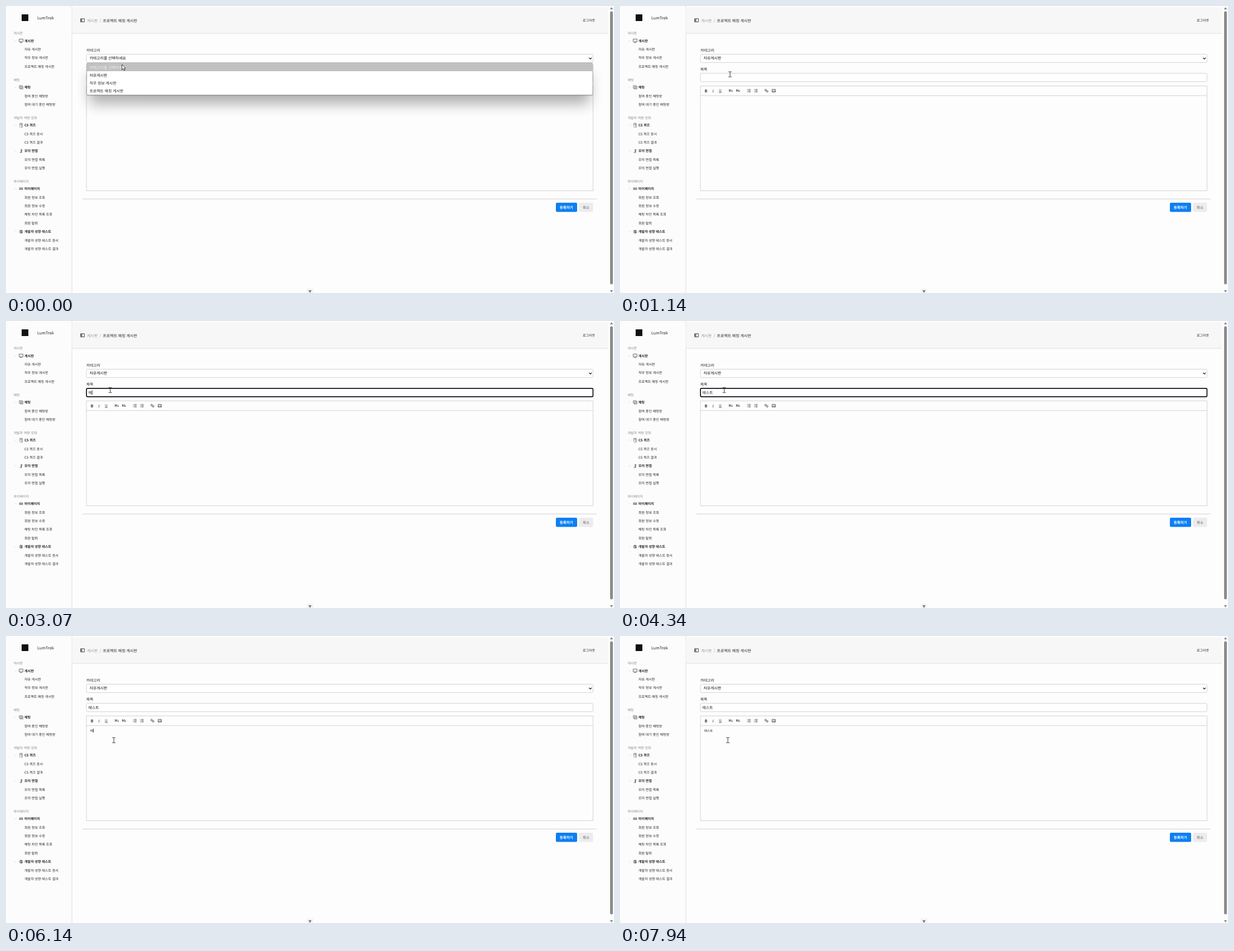
These frames come from a looping animation (1088x515 px, 8 s). An HTML page:

```html
<!DOCTYPE html>
<html lang="ko">
<head>
<meta charset="utf-8">
<title>게시글 작성</title>
<style>
  html, body { margin: 0; width: 100%; height: 100%; overflow: hidden; background: #fdfdfd; }
  svg { display: block; width: 1088px; height: 515px; }
  text { font-family: "Noto Sans CJK KR", "Noto Sans CJK", "Noto Sans", sans-serif; text-rendering: geometricPrecision; white-space: pre; }
</style>
</head>
<body>
<svg id="stage" viewBox="0 0 1088 515" xmlns="http://www.w3.org/2000/svg"></svg>
<script>
const LOOP = 8000;
const stage = document.getElementById('stage');
const $ = id => document.getElementById(id);

const label = (x, midY, str, size, { fill = '#222', weight = 500, id = '', extra = '' } = {}) =>
  `<text ${id && `id="${id}"`} x="${x}" y="${midY + size * 0.36}" font-size="${size}" font-weight="${weight}" fill="${fill}" ${extra}>${str}</text>`;
const box = (x, y, w, h, fill, rest = '') =>
  `<rect x="${x}" y="${y}" width="${w}" height="${h}" fill="${fill}" ${rest}/>`;
const stroke = (d, color = '#444', width = 0.8, rest = '') =>
  `<path d="${d}" fill="none" stroke="${color}" stroke-width="${width}" ${rest}/>`;

// Icons are drawn around their own centre.
const icons = {
  board: stroke('M-3.4-3.2H3.4V1.8H-3.4ZM-1.6 3.3H1.6', '#444'),
  chat: stroke('M-3.2-3.2H1.8V1.4H-3.2ZM1.8-1.8H3.4V3H-1.4V1.4M-2-1.6H.6M-2 0H.6', '#555', 0.7),
  quiz: stroke('M-2.2-3.4H2V3.4H0M-2.2-3.4V1.6M-2.4 3.2H-.6M-.8-1.4H.8V.6', '#555', 0.8),
  mic: stroke('M.8-3.4V1M-1-1.6H2.4M-1 .8H2M.4 1V3.2M-2.4 2.8H1.4', '#555', 0.9),
  card: box(-3.4, -2.2, 6.8, 4.2, '#777', 'rx=".6"') + stroke('M-3-.6H3M-3 .8H3M-1.2-2V1.8M1.2-2V1.8', '#ddd', 0.4),
  globe: `<circle r="2.9" fill="#ddd" stroke="#555" stroke-width=".7"/>` + stroke('M-1-2.4Q2-.8 0 .4Q2 1 1.4 2.6M0-2.6V2', '#444', 1)
};
const icon = (name, x, y) => `<g transform="translate(${x} ${y})">${icons[name]}</g>`;

const menu = [
  { title: '게시판', y: 49, groups: [['board', '게시판', 62.5, ['자유 게시판', '직무 정보 게시판', '프로젝트 매칭 게시판']]] },
  { title: '채팅', y: 132.5, groups: [['chat', '채팅', 146, ['참여 중인 채팅방', '참여 대기 중인 채팅방']]] },
  { title: '개발자 역량 강화', y: 200.5, groups: [
    ['quiz', 'CS 퀴즈', 214, ['CS 퀴즈 응시', 'CS 퀴즈 결과']],
    ['mic', '모의 면접', 260, ['모의 면접 목록', '모의 면접 실행']]] },
  { title: '마이페이지', y: 314.5, groups: [
    ['card', '마이페이지', 328, ['회원 정보 조회', '회원 정보 수정', '채팅 차단 목록 조회', '회원 탈퇴']],
    ['globe', '개발자 성향 테스트', 405, ['개발자 성향 테스트 응시', '개발자 성향 테스트 결과']]] }
];

function sidebar() {
  let out = box(0, 0, 118, 515, '#fcfcfc') + box(117.6, 0, 0.9, 515, '#dcdce2');
  out += box(28, 15, 12, 12, '#111') + label(56, 21.5, 'LumTrok', 7.2, { weight: 400 });
  for (const { title, y, groups } of menu) {
    out += label(13.5, y, title, 6, { fill: '#888', weight: 400 });
    for (const [name, head, top, items] of groups) {
      out += stroke(`M15.4 ${top - 0.8}l1.6 1.6l1.6-1.6`, '#ccc', 0.6) + icon(name, 27, top);
      out += label(33, top, head, 6.05, { weight: 700 });
      items.forEach((item, i) => { out += label(33, top + 15.35 * (i + 1), item, 6.07); });
    }
  }
  return out;
}

function header() {
  return box(118.5, 2.5, 958.5, 46.5, '#f7f7f8') + box(118.5, 48.6, 958.5, 0.9, '#dcdce2') +
    stroke('M133.5 22.8H140.3V28.6H133.5ZM135.8 22.8V28.6', '#333', 0.9) +
    stroke('M134.6 24V27.4', '#333', 0.7) +
    label(145, 26.3, '게시판', 6.9, { fill: '#999', weight: 400 }) +
    label(167.5, 26.3, '/', 6.9, { fill: '#999', weight: 400 }) +
    label(173.3, 26.3, '프로젝트 매칭 게시판', 6.95) +
    label(1032, 26.3, '로그아웃', 6);
}

function toolbar() {
  const list = x => [149.8, 152, 154.2].map(y => stroke(`M${x - 3} ${y}h1M${x - 1} ${y}h4.2`, '#444', 0.9)).join('');
  return label(151.4, 152, 'B', 7, { fill: '#333', weight: 700 }) +
    label(165.2, 152, 'I', 7, { fill: '#333', extra: 'font-style="italic" style="font-family:\'Liberation Serif\',serif"' }) +
    label(177, 151.6, 'U', 6.5, { fill: '#333' }) + stroke('M176.8 155.2h5.4') +
    label(194.6, 152, 'H<tspan font-size="4.4">1</tspan>', 6.3, { fill: '#333', weight: 700 }) +
    label(207.4, 152, 'H<tspan font-size="4.4">2</tspan>', 6.3, { fill: '#333', weight: 700 }) +
    list(230.5) + list(243) +
    `<g transform="translate(262 152) rotate(40)">${stroke('M-.3-1.3H-3V1.3H-.3M.3-1.3H3V1.3H.3M-1.4 0H1.4', '#444', 0.9)}</g>` +
    stroke('M272.2 149.6H278V154.4H272.2ZM272.6 154l2-2.2l1.2 1l1-.9l1 1.8', '#444', 0.9);
}

function form() {
  const edge = 'stroke="#cfcfd4" stroke-width=".9"';
  return label(143.8, 80, '카테고리', 6.75) +
    box(144, 86.5, 906.4, 15, '#fff', `rx="2" ${edge}`) +
    label(149.4, 94, '', 6.88, { id: 'choice', fill: '#111' }) +
    stroke('M1043.4 92.9l2.3 2.3l2.3-2.3', '#111', 1.3) +
    label(143.8, 114, '제목', 6.75) +
    box(144, 120.8, 906.4, 15, '#fff', `rx="2" id="field"`) +
    label(147.6, 128.7, '', 6.75, { id: 'titleText', fill: '#111', weight: 400 }) +
    box(144, 143.3, 906.4, 188.2, '#fdfdfd', edge) + stroke('M144 160.8H1050.4', '#cfcfd4', 0.9) +
    toolbar() +
    label(150.8, 169.8, '', 5.5, { id: 'bodyText', fill: '#111', weight: 400 }) +
    box(0, 0, 0.8, 8, '#111', 'id="caret"') +
    box(137, 345.8, 920, 0.9, '#ccccd2') +
    box(984, 353, 38, 16.6, '#0d7ff2', 'rx="2"') + label(990.8, 361.5, '등록하기', 6.55, { fill: '#fff', weight: 700 }) +
    box(1025.5, 353, 25, 16.6, '#ececee', 'rx="2"') + label(1032, 361.5, '취소', 6.4, { fill: '#555' });
}

const options = ['카테고리를 선택하세요', '자유게시판', '직무 정보 게시판', '프로젝트 매칭 게시판'];

function dropdown() {
  return `<g id="dropdown">
    <g clip-path="url(#page)">${box(150, 122, 894, 54, '#000', 'opacity=".3" filter="url(#blur)"')}</g>
    ${box(144.3, 102.2, 905.8, 57.6, '#fff', 'rx="3" stroke="#888" stroke-width=".8"')}
    ${box(144.7, 0, 905, 14.2, '#1967d2', 'id="highlight"')}
    ${options.map((o, i) => label(149.4, 110.2 + 14.2 * i, o, 6.88, { id: 'option' + i })).join('')}
  </g>`;
}

function scrollbars() {
  return box(1077, 0, 11, 515, '#fcfcfc') + box(1081, 9.5, 5, 490, '#8b8b8b', 'rx="2.5"') +
    '<path d="M1080.7 6l2.8-4l2.8 4zM1080.7 510l2.8 4l2.8-4z" fill="#8b8b8b"/>' +
    box(538, 507, 12, 8, '#f4f4f4') + '<path d="M541.3 510l2.7 5l2.7-5z" fill="#777"/>';
}

const pointers = `<g id="arrow"><path d="M0 0V9.4L2.2 7.4L3.8 10.9L5.3 10.2L3.8 6.9H6.6Z" fill="#fff" stroke="#111" stroke-width=".8"/></g>
  <g id="ibeam">${stroke('M-2.8-4.6H-.6L0-4.1L.6-4.6H2.8M0-4.1V4.1M-2.8 4.6H-.6L0 4.1L.6 4.6H2.8', '#222', 0.9)}</g>`;

stage.innerHTML = `<defs>
    <filter id="blur" x="-5%" y="-100%" width="110%" height="300%"><feGaussianBlur stdDeviation="12"/></filter>
    <clipPath id="page"><path d="M118.5 102H1077V240H118.5Z"/></clipPath>
  </defs>` + box(0, 0, 1088, 515, '#fdfdfd') + sidebar() + header() + form() + dropdown() + scrollbars() + pointers;

const PICK = 950, FOCUS_TITLE = 1450, FOCUS_BODY = 5200;
const titleKeys = [[0, ''], [1850, 'x'], [2450, ''], [2800, 'ㅌ'], [2980, '테'], [3250, '텟'], [3420, '테스'], [3620, '테슽'], [3780, '테스트']];
const bodyKeys = [[0, ''], [5900, 'ㅌ'], [6080, '테'], [6350, '텟'], [6550, '테스'], [6800, '테슽'], [7000, '테스트']];
const path = [[0, 207.5, 105], [100, 207.5, 105], [560, 197.5, 122.5], [1100, 197.5, 122.5], [1400, 186.5, 124], [4750, 186.5, 124], [5100, 193, 187], [LOOP, 193, 187]];

const latest = (keys, t) => keys.filter(k => k[0] <= t).pop();

function pointerAt(t) {
  const i = path.findIndex(p => p[0] > t);
  const [t0, x0, y0] = path[i - 1], [t1, x1, y1] = path[i];
  const u = (t - t0) / (t1 - t0), e = u * u * (3 - 2 * u);
  return [x0 + (x1 - x0) * e, y0 + (y1 - y0) * e];
}

function set(id, attrs) {
  for (const name in attrs) $(id).setAttribute(name, attrs[name]);
}
const show = (id, on) => set(id, { visibility: on ? 'visible' : 'hidden' });

function drawDropdown(open, y) {
  set('dropdown', { display: open ? 'inline' : 'none' });
  const row = y < 117.2 ? 0 : 1;
  set('highlight', { y: 102.8 + 14.2 * row, fill: row ? '#1967d2' : '#c1c1c1' });
  set('option0', { fill: row ? '#777' : '#ededed' });
  set('option1', { fill: row ? '#fff' : '#111' });
}

function drawCaret(t) {
  const inBody = t >= FOCUS_BODY;
  const focus = inBody ? FOCUS_BODY : FOCUS_TITLE;
  const since = t - Math.max(focus, latest(inBody ? bodyKeys : titleKeys, t)[0]);
  const left = inBody ? 150.8 : 147.6;
  const width = $(inBody ? 'bodyText' : 'titleText').getComputedTextLength();
  set('caret', { x: left + width, y: inBody ? 166.2 : 124.4, height: inBody ? 7 : 8 });
  show('caret', t >= focus && since % 1000 < 500);
}

function draw(t) {
  const [x, y] = pointerAt(t);
  const open = t < PICK;
  const focused = t >= FOCUS_TITLE && t < FOCUS_BODY;
  drawDropdown(open, y);
  $('choice').textContent = options[open ? 0 : 1];
  $('titleText').textContent = latest(titleKeys, t)[1];
  $('bodyText').textContent = latest(bodyKeys, t)[1];
  set('field', { stroke: focused ? '#101018' : '#cfcfd4', 'stroke-width': focused ? 1.7 : 0.9 });
  drawCaret(t);

  const overText = !open && (y < 136 || y > 161);
  show('arrow', !overText);
  show('ibeam', overText);
  set(overText ? 'ibeam' : 'arrow', { transform: `translate(${x} ${y})` });
}

const start = performance.now();
function tick() {
  draw((performance.now() - start) % LOOP);
  requestAnimationFrame(tick);
}
tick();
</script>
</body>
</html>
```
